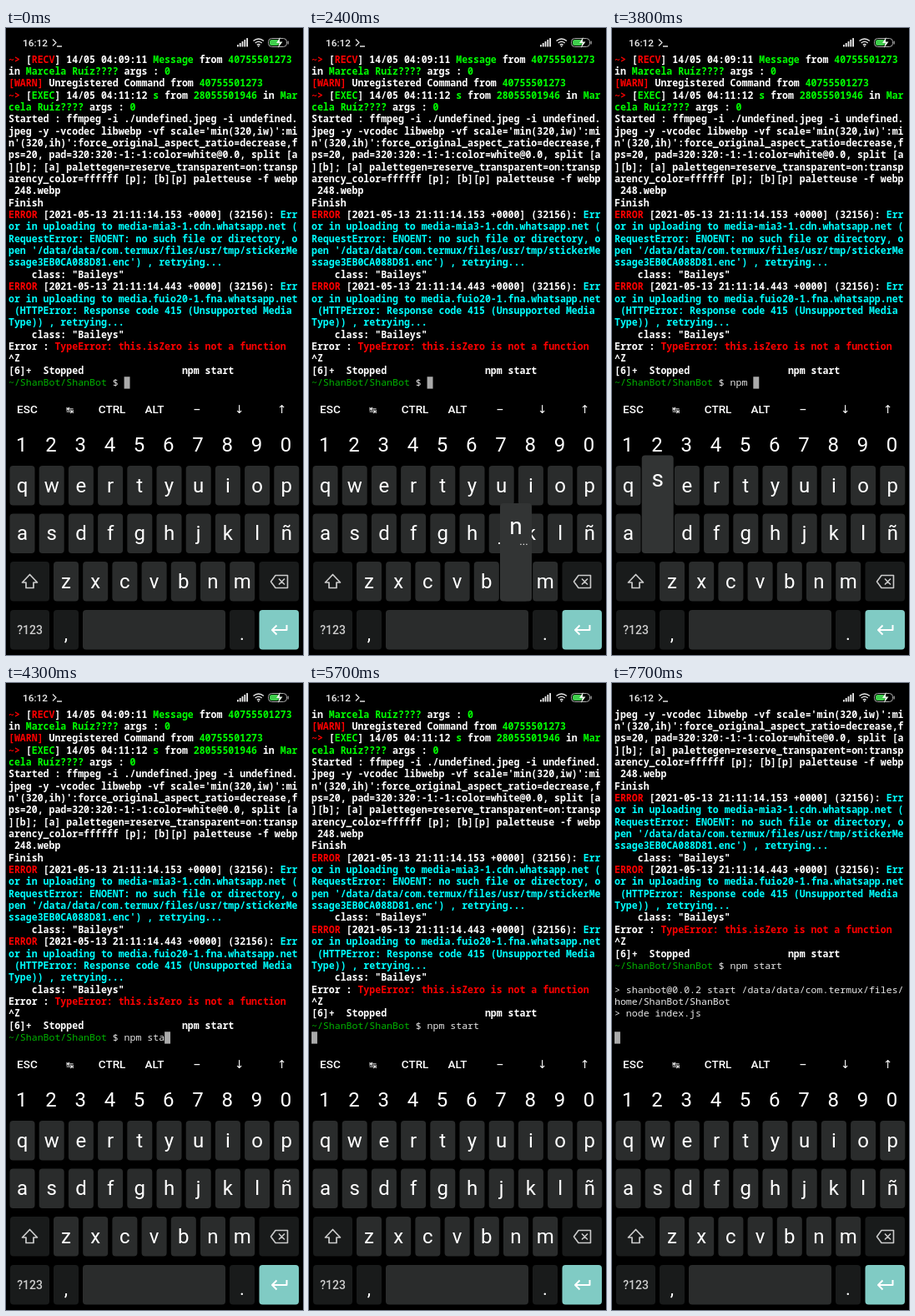
Recreate the animation shown at these times as an HTML page with a canvas. Size 356 by 752 pixels, loop 8 s.

```html
<!DOCTYPE html>
<html lang="en">
<head>
<meta charset="utf-8">
<title>Terminal</title>
<style>
html, body { margin: 0; width: 356px; height: 752px; overflow: hidden; background: #000; }
canvas { display: block; width: 356px; height: 752px; }
</style>
</head>
<body>
<canvas id="stage"></canvas>
<script>
const canvas = document.getElementById('stage');
const ctx = canvas.getContext('2d');
const scale = window.devicePixelRatio || 1;
canvas.width = 356 * scale;
canvas.height = 752 * scale;

const LOOP = 8000;
const SANS = 'Roboto, "DejaVu Sans", sans-serif';
const MONO = '"Noto Sans Mono", "DejaVu Sans Mono", monospace';

// Terminal grid
const COLS = 50, ROWS = 28, CELL_W = 6.93, CELL_H = 14.35, LEFT = 3, TOP = 30.8;

// Style codes inside the text: "{" plus one letter
const STYLES = {
  w: ['#fff', 600], r: ['#f00', 600], g: ['#0f0', 600], c: ['#0ff', 600],
  p: ['#00b400', 400], n: ['#e8e8e8', 400]
};

const LOG = `{r~> {w[{rRECV{w] 14/05 04:09:11 {gMessage {wfrom {g40755501273 {win {gMarcela Ruíz???? {wargs : {g0
{r[WARN] {wUnregistered Command from {g40755501273
{r~> {w[{gEXEC{w] 14/05 04:11:12 {gs {wfrom {g28055501946 {win {gMarcela Ruíz???? {wargs : {g0
{wStarted : ffmpeg -i ./undefined.jpeg -i undefined.jpeg -y -vcodec libwebp -vf scale='min(320,iw)':min'(320,ih)':force_original_aspect_ratio=decrease,fps=20, pad=320:320:-1:-1:color=white@0.0, split [a][b]; [a] palettegen=reserve_transparent=on:transparency_color=ffffff [p]; [b][p] paletteuse -f webp 248.webp
Finish
{rERROR {w[2021-05-13 21:11:14.153 +0000] (32156): {cError in uploading to media-mia3-1.cdn.whatsapp.net (RequestError: ENOENT: no such file or directory, open '/data/data/com.termux/files/usr/tmp/stickerMessage3EB0CA088D81.enc') , retrying...
{w    class: "Baileys"
{rERROR {w[2021-05-13 21:11:14.443 +0000] (32156): {cError in uploading to media.fuio20-1.fna.whatsapp.net (HTTPError: Response code 415 (Unsupported Media Type)) , retrying...
{w    class: "Baileys"
Error : {rTypeError: this.isZero is not a function
{w^Z
[6]+  Stopped${' '.repeat(17)}npm start
{p~/ShanBot/ShanBot {n$ `;

const OUTPUT = `
> shanbot@0.0.2 start /data/data/com.termux/files/home/ShanBot/ShanBot
> node index.js

`;

// [character, pressed at, released at]; a character is typed on release
const PRESSES = [
  ['n', 2400, 2500], ['p', 2700, 2900], ['m', 3000, 3200], [' ', 3300, 3400],
  ['s', 3700, 3900], ['t', 4000, 4200], ['a', 4300, 4300], ['r', 4900, 5000],
  ['t', 5100, 5300], ['\n', 5600, 5700]
];
const OUTPUT_AT = 7700;

const LETTER_ROWS = [['qwertyuiop', 19.5, 525], ['asdfghjklñ', 19.5, 582.5], ['zxcvbnm', 72, 640]];
const PITCH = 35.2, KEY_W = 30, KEY_H = 47.5;

function box(x, y, w, h, r, fill) {
  ctx.fillStyle = fill;
  ctx.beginPath();
  ctx.roundRect(x, y, w, h, r);
  ctx.fill();
}

function label(text, x, y, size, color = '#fff', weight = 400) {
  ctx.font = `${weight} ${size}px ${SANS}`;
  ctx.textAlign = 'center';
  ctx.fillStyle = color;
  ctx.fillText(text, x, y);
}

function line(d, color, width) {
  ctx.strokeStyle = color;
  ctx.lineWidth = width;
  ctx.stroke(new Path2D(d));
}

function shape(d, color) {
  ctx.fillStyle = color;
  ctx.fill(new Path2D(d));
}

function drawTerminal(text) {
  const cells = [];
  let row = 0, col = 0, style = 'w';
  for (let i = 0; i < text.length; i++) {
    const ch = text[i];
    if (ch === '{') { style = text[++i]; continue; }
    if (ch === '\n') { row++; col = 0; continue; }
    if (col === COLS) { row++; col = 0; }
    cells.push([ch, row, col++, style]);
  }
  const first = Math.max(0, row - ROWS + 1);
  const x = c => LEFT + c * CELL_W;
  const y = r => TOP + (r - first) * CELL_H;
  ctx.textAlign = 'left';
  for (const [ch, r, c, s] of cells) {
    if (r < first || ch === ' ') continue;
    const [color, weight] = STYLES[s];
    ctx.font = `${weight} 11.55px ${MONO}`;
    ctx.fillStyle = color;
    ctx.fillText(ch, x(c), y(r) + 10.7);
  }
  ctx.fillStyle = '#aaa';
  ctx.fillRect(x(col), y(row), CELL_W, CELL_H);
}

function drawStatusBar() {
  label('16:12', 35, 21.5, 11.8, '#eee', 500);
  line('M56 13.5l4 4-4 4M61 22h6', '#ddd', 1.3);
  for (let i = 0; i < 5; i++) box(277 + i * 2.8, 20 - i * 2, 1.8, 2.5 + i * 2, .5, '#eee');
  line('M296.5 15.5q6.2-5 12.4 0M298.7 18q4-3.2 8 0M300.8 20.3q1.9-1.5 3.8 0', '#eee', 1.4);
  shape('M301.3 21.3h2.8l-1.4 1.7z', '#eee');
  ctx.strokeStyle = '#aaa';
  ctx.lineWidth = 1;
  ctx.beginPath();
  ctx.roundRect(314.5, 12.5, 22, 10, 4);
  ctx.stroke();
  box(316, 14, 11, 7, 2.5, '#3fce4c');
  shape('M328.5 11l-4.5 7h3.5l-1.5 6 5.5-7.500h-3.500z', '#e8f8e8');
  box(337.5, 15.5, 1.3, 4, .6, '#aaa');
}

function drawKeyboard(held) {
  ['ESC', '↹', 'CTRL', 'ALT', '–', '↓', '↑'].forEach((text, i) =>
    label(text, 25.4 + i * 50.86, 462, text === '↹' ? 11 : 13.5, '#fff', 500));
  [...'1234567890'].forEach((digit, i) => label(digit, 18.8 + i * PITCH, 507.500, 24));

  let popup = null;
  for (const [letters, start, y] of LETTER_ROWS) {
    [...letters].forEach((ch, i) => {
      const x = start + i * PITCH;
      box(x - KEY_W / 2, y, KEY_W, KEY_H, 4, '#2a2c2c');
      label(ch, x, y + 31.5, 24);
      if (ch === held) popup = [x, y];
    });
  }

  const dark = '#191b1b', gray = '#ccc';
  box(5, 640, 47, KEY_H, 4, dark);
  line('M28.500 655.500l9 9.500h-4.500v6.500h-9v-6.500h-4.500z', gray, 1.7);
  box(303.5, 640, 47.500, KEY_H, 4, dark);
  line('M317.500 664l5.500-7.500h14.500v15h-14.500zM327 660.500l7 7M334 660.500l-7 7', gray, 1.6);

  box(5, 698, 47, KEY_H, 4, dark);
  label('?123', 28.500, 727, 14, gray, 500);
  box(57, 698, KEY_W, KEY_H, 4, dark);
  label(',', 72, 734, 22);
  box(92, 698, 171, KEY_H, 4, held === ' ' ? '#3a3c3c' : '#2a2c2c');
  box(268, 698, KEY_W, KEY_H, 4, dark);
  label('.', 283, 734, 22);
  box(303.500, 698, 47.500, KEY_H, 4, held === '\n' ? '#96d5cf' : '#80cbc4');
  line('M336.500 716v6h-17M324.500 716.500l-5.500 5.500 5.500 5.500', '#fff', 2);

  if (popup) {
    const [x, y] = popup;
    box(x - 19, y - 70, 38, 70 + KEY_H, 4, '#323434');
    label(held, x, y - 33, 28);
    if (held === 'n') label('...', x + 9.5, y - 20, 13);
  }
}

function draw(now) {
  const t = now % LOOP;
  const typed = PRESSES.filter(p => t >= p[2]).map(p => p[0]).join('');
  const press = PRESSES.find(p => t >= p[1] && t < p[2]);
  ctx.setTransform(scale, 0, 0, scale, 0, 0);
  ctx.fillStyle = '#000';
  ctx.fillRect(0, 0, 356, 752);
  ctx.lineJoin = 'round';
  drawStatusBar();
  drawTerminal(LOG + typed + (t >= OUTPUT_AT ? OUTPUT : ''));
  drawKeyboard(press && press[0]);
}

function tick() {
  draw(performance.now());
  requestAnimationFrame(tick);
}
tick();
</script>
</body>
</html>
```
